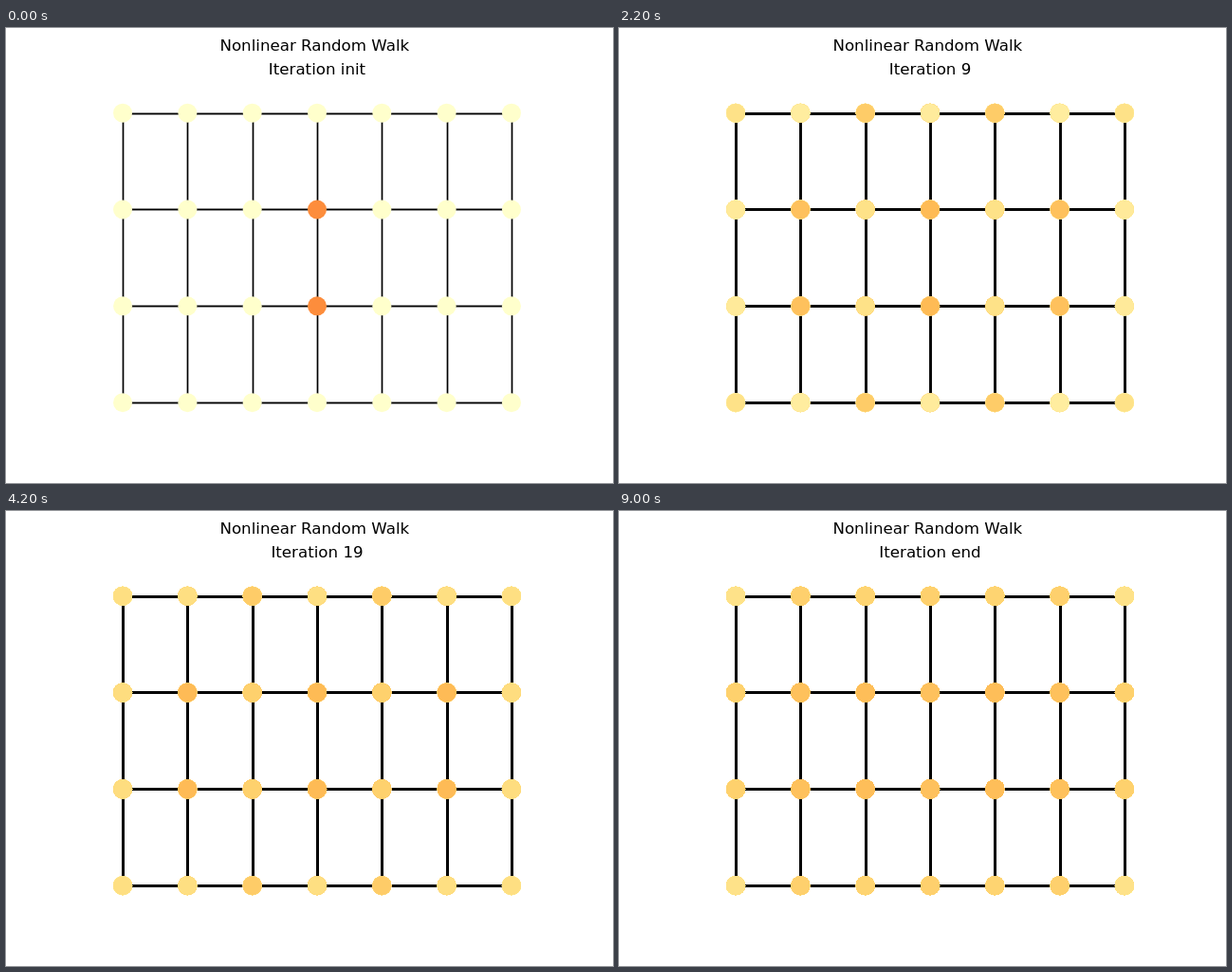
An HTML page with a canvas for the animation above (9.2 s loop, 640 by 480 pixels).

```html
<!DOCTYPE html>
<html>
<head>
<meta charset="utf-8">
<style>
  html, body { margin: 0; width: 640px; height: 480px; overflow: hidden; background: #fff; }
  canvas { display: block; }
</style>
</head>
<body>
<canvas id="stage" width="640" height="480"></canvas>
<script>
const ctx = document.getElementById('stage').getContext('2d');
const ROWS = 4, COLS = 7, STEPS = 46, STEP_MS = 200;
const MIDDLE_LINK = 0.25;
const PALETTE = [[255, 255, 204], [255, 237, 160], [254, 217, 118], [254, 178, 76], [253, 141, 60]];

const nodes = [];
for (let row = 0; row < ROWS; row++)
  for (let col = 0; col < COLS; col++)
    nodes.push({ row, col, x: 123.05 + col * 68.317, y: 89.67 + row * 101.82, links: [] });

const edges = [];
function connect(a, b, weight) {
  edges.push([nodes[a], nodes[b]]);
  nodes[a].links.push([b, weight]);
  nodes[b].links.push([a, weight]);
}
nodes.forEach(({ row, col }, i) => {
  if (col < COLS - 1) connect(i, i + 1, 1);
  if (row < ROWS - 1) connect(i, i + COLS, row === 1 ? MIDDLE_LINK : 1);
});

// Density per link after each step of the walk
const walk = [nodes.map(n => +(n.col === 3 && (n.row === 1 || n.row === 2)))];
while (walk.length < STEPS - 2) {
  const last = walk[walk.length - 1];
  walk.push(nodes.map(({ links }) => {
    let flow = 0, total = 0;
    for (const [j, weight] of links) {
      flow += weight * last[j];
      total += weight;
    }
    return flow / total;
  }));
}

function color(value) {
  const pos = Math.min(value * 8, 4), k = Math.min(Math.floor(pos), 3);
  const mix = PALETTE[k].map((c, i) => Math.round(c + (PALETTE[k + 1][i] - c) * (pos - k)));
  return `rgb(${mix})`;
}

// Saturating load of every node, as colours
const colors = walk.map((density, n) => {
  const load = density.map((d, i) => d * nodes[i].links.length);
  const scale = (11.25 - 9.25 * 0.896 ** n) / load.reduce((a, b) => a + b);
  return load.map(v => color(v * scale / (1 + v * scale)));
});

const snap = v => Math.round(v) + 0.5;

function drawEdges() {
  ctx.lineWidth = 1.39;
  for (const [a, b] of edges) {
    ctx.beginPath();
    ctx.moveTo(snap(a.x), snap(a.y));
    ctx.lineTo(snap(b.x), snap(b.y));
    ctx.stroke();
  }
}

function drawNodes(fills) {
  nodes.forEach(({ x, y }, i) => {
    ctx.fillStyle = fills[i];
    ctx.beginPath();
    ctx.arc(x, y, 10, 0, 2 * Math.PI);
    ctx.fill();
  });
}

function draw(step) {
  ctx.fillStyle = '#fff';
  ctx.fillRect(0, 0, 640, 480);
  ctx.strokeStyle = '#000';
  // Layers pile up, so soft edges harden over time
  for (let s = -1; s <= step; s++) drawEdges();
  for (let s = 0; s <= step; s++)
    drawNodes(colors[Math.min(Math.max(s - 1, 0), colors.length - 1)]);

  const label = step < 2 ? 'init' : step === STEPS - 1 ? 'end' : step - 2;
  ctx.fillStyle = '#000';
  ctx.font = '16.667px "DejaVu Sans", sans-serif';
  ctx.textAlign = 'center';
  ctx.fillText('Nonlinear Random Walk', 325.3, 24);
  ctx.fillText('Iteration ' + label, 328, 49);
}

let shown = -1;
function tick() {
  const step = Math.floor(performance.now() / STEP_MS) % STEPS;
  if (step !== shown) draw(shown = step);
  requestAnimationFrame(tick);
}
tick();
</script>
</body>
</html>
```
